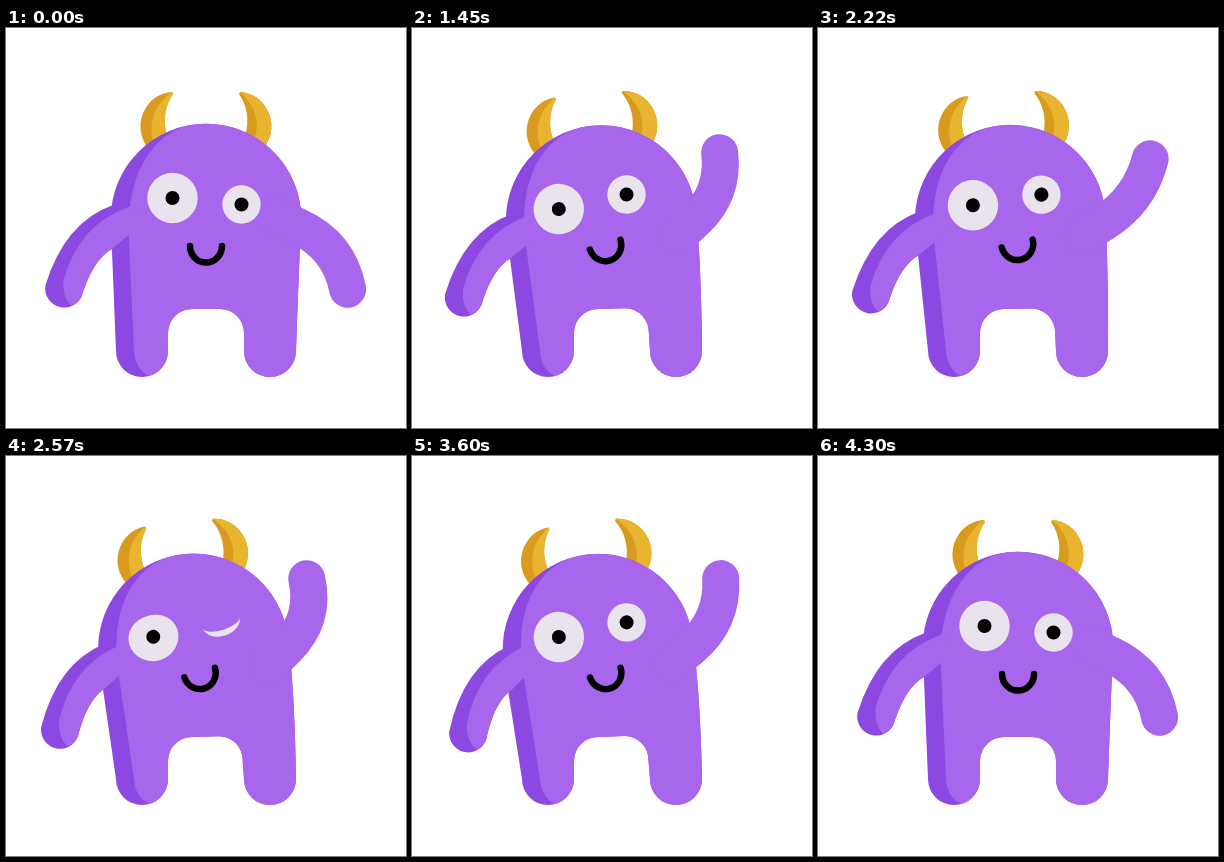
These frames come from a looping animation (400x400 px, 4320 ms). An HTML page:

```html
<!DOCTYPE html>
<html lang="en">
<head>
<meta charset="utf-8">
<title>Waving monster</title>
<style>
  html, body { margin: 0; width: 100%; height: 100%; overflow: hidden; background: #fff; }
  svg { display: block; width: 100%; height: 100%; }
  .light { fill: #a866ec; }
  .dark { fill: #8d48e2; }
  .gold { fill: #e9b42f; }
  .amber { fill: #d99b1e; }
  .white { fill: #e9e3ed; }
  .line { fill: none; stroke-linecap: round; stroke-linejoin: round; }
</style>
</head>
<body>
<svg viewBox="0 0 400 400">
  <defs>
    <clipPath id="lidL"><path id="lidLPath"/></clipPath>
    <clipPath id="lidR"><path id="lidRPath"/></clipPath>
  </defs>
  <g id="horns">
    <path class="amber" d="M166 64C141 65 124 96 142 120L164 114C156 100 157 80 167 66Z"/>
    <path class="gold" d="M166 64C150 76 140 92 149 120L164 114C156 100 157 80 167 66Z"/>
    <path class="amber" d="M234 64C259 65 276 96 258 120L236 114C244 100 243 80 233 66Z"/>
    <path class="gold" d="M234 64C259 65 276 96 258 120L246 116C254 102 253 80 234 64Z"/>
  </g>
  <path id="bodyDark" class="dark"/>
  <path id="bodyLight" class="light"/>
  <g id="armL">
    <path class="dark" d="M122 183L107 177Q59 194 39.500 257A18.800 18.800 0 0 0 77 264Q88 231 106 221L122 206Z"/>
    <path class="light" d="M124 178.500Q73 196 57.500 252Q56 269 65 277.500A18.800 18.800 0 0 0 77 264Q88 231 106 221L124 206L140 192Z"/>
  </g>
  <path id="armR" class="line" stroke="#a866ec" stroke-width="37"/>
  <g id="face">
    <g transform="translate(166.5 170)">
      <g clip-path="url(#lidL)"><circle class="white" r="26"/><circle r="7"/></g>
    </g>
    <g transform="translate(235.5 176.5)">
      <g clip-path="url(#lidR)"><circle class="white" r="20"/><circle r="7"/></g>
    </g>
    <path class="line" d="M184 218A16 16.500 0 0 0 216 218" stroke="#000" stroke-width="6.500"/>
  </g>
</svg>
<script>
const LOOP = 4320, START = 1020, END = 4300;
const SWAY = 1060, WAVE = 550;

const set = (id, name, value) => document.getElementById(id).setAttribute(name, value);
const mix = (a, b, u) => a + (b - a) * u;
const cycle = (t, period, peak) => Math.cos(2 * Math.PI * (t - peak) / period);

// Eased 0 to 1 between two times.
function ramp(t, from, to) {
  const u = Math.min(1, Math.max(0, (t - from) / (to - from)));
  return (1 - Math.cos(Math.PI * u)) / 2;
}

// Rises over the first pair of times and falls over the second.
const pulse = (t, a, b, c, d) => ramp(t, a, b) - ramp(t, c, d);

function polar(x, y, length, degrees) {
  const a = degrees * Math.PI / 180;
  return [x + length * Math.cos(a), y + length * Math.sin(a)];
}

function drawBody(s) {
  const dx = -14.5 * s, dy = 2.2 * s, tilt = -7.5 * s;
  const a = tilt * Math.PI / 180, cos = Math.cos(a), sin = Math.sin(a);
  const p = (x, y) => `${200 + dx + x * cos - y * sin} ${191 + dy + x * sin + y * cos} `;
  const dome = `A95.3 95.3 0 0 1 ${p(95.3, 0)}`;
  const legs = `Q${293 - 5 * s} 235 290 323A26 26 0 0 1 238 323L${238 - 1.5 * s} 305` +
    `A24 24 0 0 0 ${214 - s} ${281 - s}L186 281A24 24 0 0 0 162 305L162 323`;
  set('bodyDark', 'd', `M110 323L${p(-95.3, 0)}${dome}${legs}A26 26 0 0 1 110 323Z`);
  set('bodyLight', 'd', `M128 323L${p(-77, 22)}C${p(-81, -48)}${p(-50, -91)}${p(-8, -95)}` +
    `${dome}${legs}A26 26 0 0 1 143 348Q129 341 128 323Z`);
  set('horns', 'transform', `translate(${dx} ${dy}) rotate(${tilt} 200 191)`);
}

// The arm is an arc: its chord points along angle, its ends turn by bend.
function drawRightArm(s, lift, wave) {
  const angle = mix(52, -60 - 14.5 * wave, lift);
  const bend = mix(27, -24 - 5 * wave, lift);
  const reach = mix(79, 77 - 5 * wave, lift);
  const x = 293 - 14 * s, y = 199 - 8 * s;
  const root = polar(x, y, -25, angle - bend);
  const knee = polar(x, y, reach / 2 / Math.cos(bend * Math.PI / 180), angle - bend);
  const tip = polar(x, y, reach, angle);
  set('armR', 'd', `M${root}L${x} ${y}Q${knee} ${tip}`);
}

// Eye outline with separate heights above and below; a negative top sags.
function lid(r, top, bottom) {
  const sweep = top < 0 ? 1 : 0;
  return `M${-r} 0A${r} ${bottom} 0 0 0 ${r} 0A${r} ${Math.abs(top)} 0 0 ${sweep} ${-r} 0Z`;
}

function drawFace(amount, side, wink) {
  const x = amount * mix(-4.5, -20.5, side);
  const y = amount * mix(-2.8, 0.5, side);
  const tilt = amount * mix(-11.3, -17.7, side);
  set('face', 'transform', `translate(${x} ${y}) rotate(${tilt} 201 173.25)`);
  set('lidLPath', 'd', lid(25.2, 25.2 - 3.5 * wink, 25.2 - wink));
  set('lidRPath', 'd', lid(19.2, 19.2 - 26.9 * wink, 19.2 - 5.5 * wink));
}

function draw(time) {
  const t = time < START ? 0 : time;
  const amount = pulse(t, 960, 1480, 3600, END);
  const drift = (t - 1500) / 2120;
  const sway = cycle(t, SWAY, 1500);
  const lean = amount * (0.56 + 0.2 * drift + 0.21 * sway);
  const swing = amount * (1.2 - 4.9 * drift - 1.7 * sway);

  drawBody(lean);
  set('armL', 'transform', `translate(${-9 * lean} ${11.5 * lean}) rotate(${swing} 123 192)`);
  drawRightArm(lean, pulse(t, 1000, 1500, 3700, END), cycle(t, WAVE, 1495));
  drawFace(amount, (1 + cycle(t, SWAY, 1440)) / 2, pulse(t, 2380, 2540, 2620, 2780));
}

const begin = performance.now();
function tick() {
  draw((performance.now() - begin) % LOOP);
  requestAnimationFrame(tick);
}
tick();
</script>
</body>
</html>
```
